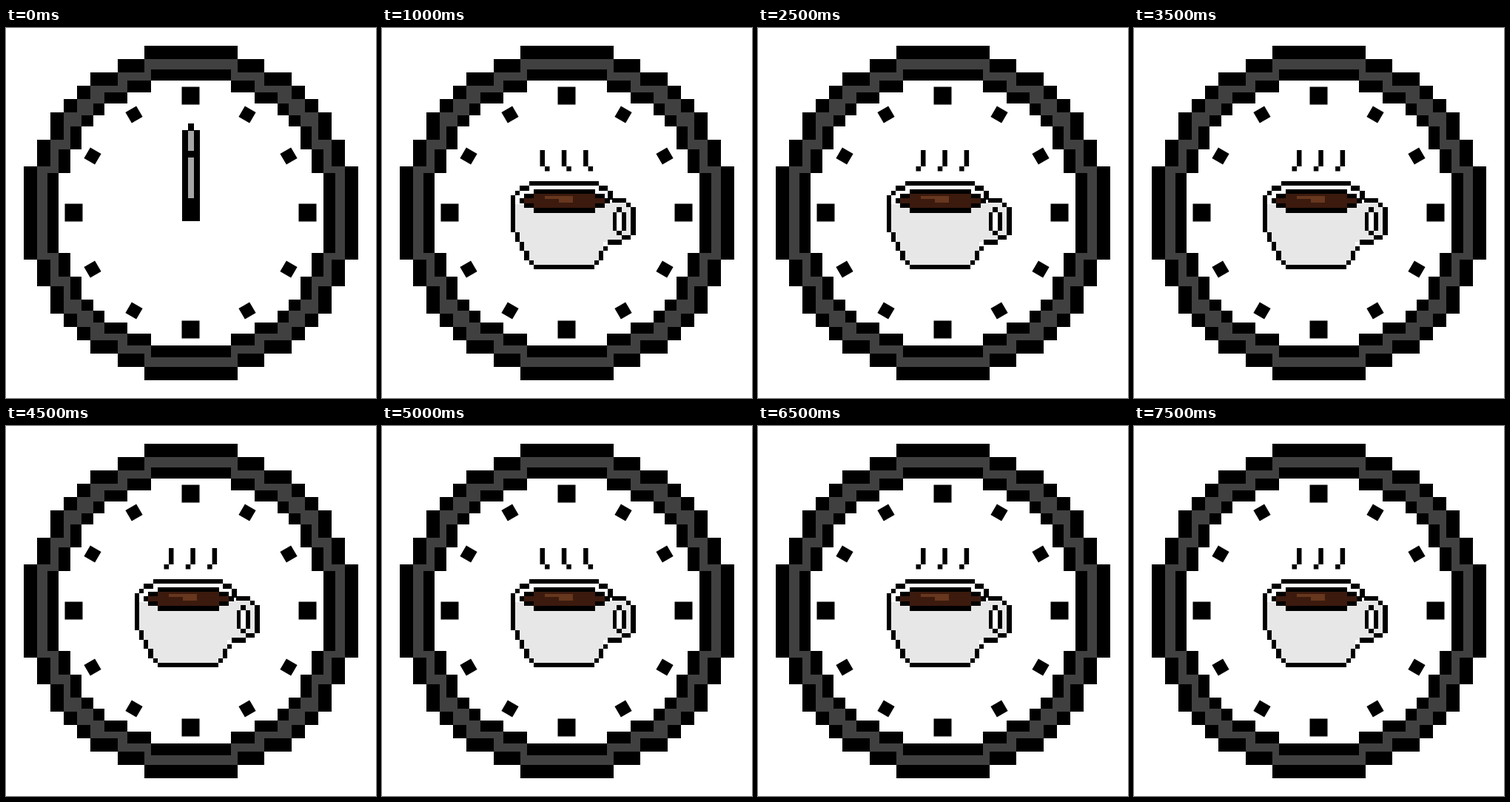
An HTML page for the animation above (8000 ms loop, 500 by 500 pixels).

```html
<!DOCTYPE html>
<html lang="en">
<head>
<meta charset="utf-8">
<title>Coffee clock</title>
<style>
  html, body { margin: 0; width: 100%; height: 100%; overflow: hidden; background: #fff; }
  svg { display: block; width: 100vw; height: 100vh; }
</style>
</head>
<body>
<svg id="stage" viewBox="0 0 500 500"></svg>
<script>
const NS = 'http://www.w3.org/2000/svg';
const LOOP = 8000;
const BLACK = '#000', WHITE = '#fff', FRAME = '#404040', METAL = '#a6a6a6';
const CHINA = '#e7e7e7', COFFEE = '#3c1a0e', SHINE = '#67371e';
const stage = document.getElementById('stage');

function add(parent, tag, attrs = {}) {
  const el = document.createElementNS(NS, tag);
  for (const key in attrs) el.setAttribute(key, attrs[key]);
  return parent.appendChild(el);
}
const box = (parent, x, y, width, height, fill = BLACK) =>
  add(parent, 'rect', { x, y, width, height, fill });

// Returns a painter for rectangles measured in cells, snapped to whole pixels
function grid(parent, x0, y0, size) {
  const px = v => Math.round(x0 + v * size);
  const py = v => Math.round(y0 + v * size);
  return (x, y, w, h, fill) =>
    box(parent, px(x), py(y), px(x + w) - px(x), py(y + h) - py(y), fill);
}

// Steps cell by cell along straight lines between key points
function trace(cell, points) {
  points.slice(1).forEach(([x2, y2], i) => {
    const [x1, y1] = points[i];
    const n = Math.max(Math.abs(x2 - x1), Math.abs(y2 - y1));
    for (let k = 0; k <= n; k++) {
      cell(Math.round(x1 + (x2 - x1) * k / n), Math.round(y1 + (y2 - y1) * k / n), 1, 1);
    }
  });
}

// Pixel disc, 25 cells across, with a one-cell black edge
function disc(size, fill) {
  const R = 12;
  const reach = d => d > R ? -1 : Math.floor(Math.sqrt(155 - d * d));
  const corner = 250 - (R + 0.5) * size;
  const cell = grid(stage, corner, corner, size);
  for (let d = -R; d <= R; d++) {
    const w = reach(Math.abs(d));
    const inner = Math.min(w - 1, reach(Math.abs(d) + 1));
    cell(R - w, R + d, 2 * w + 1, 1);
    if (inner >= 0) cell(R - inner, R + d, 2 * inner + 1, 1, fill);
  }
}
disc(18.08, FRAME);
disc(15.56, WHITE);

for (let i = 0; i < 12; i++) {
  const main = i % 3 === 0;
  const size = main ? 24 : 17;
  const radius = main ? 158 : 153;
  box(stage, 249.5 - size / 2, 249.5 - radius - size / 2, size, size)
    .setAttribute('transform', `rotate(${i * 30} 249.5 249.5)`);
}

// Hands at twelve
const hands = add(stage, 'g');
box(hands, 246, 129, 8, 10);
box(hands, 238, 138, 24, 123);
box(hands, 246, 139, 8, 27, METAL);
box(hands, 246, 175, 8, 55, METAL);

// Cup: handle first, then the bowl tapering by one cell every two rows
const cup = add(stage, 'g');
const bowl = grid(cup, 173.5, 207, 6.28);
const handle = grid(cup, 173, 211, 6.28);

handle(21, 4, 4, 8, CHINA);
handle(25, 5, 1, 6, CHINA);
handle(23, 6, 1, 4, WHITE);
trace(handle, [[22, 3], [24, 3], [26, 5], [26, 10], [25, 11], [24, 11], [23, 12], [21, 12]]);
trace(handle, [[23, 5], [22, 6], [22, 9], [23, 10], [24, 9], [24, 6], [23, 5]]);

for (let row = 5; row < 18; row++) {
  const inset = Math.max(0, Math.floor((row - 9) / 2));
  bowl(inset + 1, row, 21 - 2 * inset, 1, CHINA);
  bowl(inset, row, 1, 1);
  if (row > 13) bowl(22 - inset, row, 1, 1);
}
trace(bowl, [[0, 5], [0, 3], [1, 2], [2, 1], [3, 1], [4, 0], [18, 0], [21, 2], [21, 3]]);
trace(bowl, [[5, 18], [17, 18]]);

// Coffee: a lens whose ends step in by 0, 1, 3 cells
const lens = grid(cup, 186, 217.5, 6.4);
const step = d => d * (d + 1) / 2;
for (let d = -2; d <= 2; d++) {
  const edge = step(Math.abs(d)), fill = step(Math.abs(d) + 1);
  lens(edge, d + 2, 19 - 2 * edge, 1);
  if (Math.abs(d) < 2) lens(fill, d + 2, 19 - 2 * fill, 1, COFFEE);
}
box(cup, 220, 227, 38, 4, SHINE);
box(cup, 239, 231, 19, 5, SHINE);

// Steam: three hooks, feet to the right or to the left
function steam(stem, foot) {
  const g = add(stage, 'g');
  for (let i = 0; i < 3; i++) {
    const x = 213.5 + 29.3 * i;
    box(g, x + stem, 165, 6.5, 22);
    box(g, x + foot, 187, 6.5, 6.5);
  }
  return g;
}
const right = steam(0, 6.5);
const left = steam(6.5, 0);

const show = (el, on) => el.setAttribute('visibility', on ? 'visible' : 'hidden');
const begin = performance.now();

function draw(now) {
  const t = Math.max(0, now - begin) % LOOP;
  const served = t >= 1000;
  const even = Math.floor(t / 500) % 2 === 0;
  show(hands, !served);
  show(cup, served);
  show(right, served && even);
  show(left, served && !even);
  requestAnimationFrame(draw);
}
draw(begin);
</script>
</body>
</html>
```
